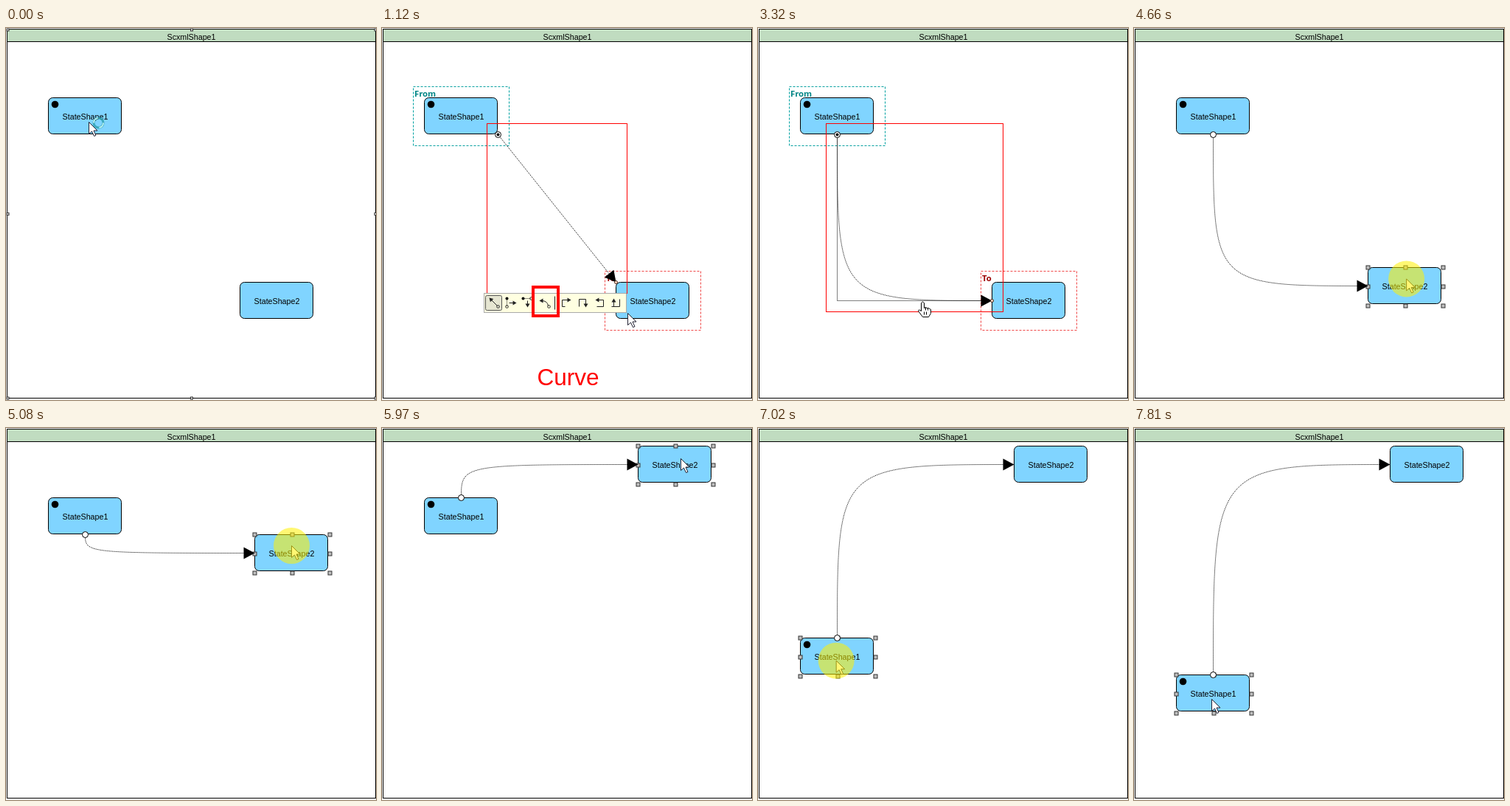
Recreate the animation shown at these times as an HTML page. Size 502 by 504 pixels, loop 8000 ms.

```html
<!DOCTYPE html>
<html lang="en">
<head>
<meta charset="utf-8">
<style>
  html, body { margin: 0; width: 100%; height: 100%; overflow: hidden; background: #fff; }
  svg { display: block; }
  text { font: 10.7px "Liberation Sans", Arial, sans-serif; }
  .tag { font: bold 11.3px "Open Sans", "Noto Sans", sans-serif; }
  .callout { font-size: 31.5px; fill: #f00; }
  .dots { fill: none; stroke: #000; stroke-dasharray: 1 1; }
  .icon { fill: none; stroke: #222; }
</style>
</head>
<body>
<svg width="502" height="504" viewBox="0 0 502 504"><g id="scene" transform="translate(.5 .5)"></g></svg>
<script>
const LOOP = 8000;
const scene = document.getElementById('scene');

// Screen updates come in bursts: [first, last, number of updates]
const BURSTS = [
  [70, 840, 12], [910, 1120, 4], [2310, 2790, 8], [3120, 3320, 3], [4040, 4800, 10],
  [4870, 5640, 12], [5970, 6740, 12], [6810, 7370, 9], [7700, 7810, 2]
];

// Pointer path: time, x, y
const POINTER = [
  [70, 112, 127], [840, 384, 366], [1120, 333, 386], [2240, 333, 386], [2500, 275, 396],
  [2790, 222, 371], [4040, 222, 371], [4520, 367, 359], [4590, 367, 359], [4800, 378, 259],
  [5080, 387, 159], [5640, 401, 42], [5970, 405, 41], [6460, 106, 123], [6530, 106, 123],
  [6670, 106, 163], [6740, 106, 223], [6950, 106, 305], [7370, 104, 363], [7700, 104, 363],
  [7810, 105, 367]
];

const PRESSES = [[140, 910], [3120, 3320], [4590, 5970], [6530, 7370]];
const PICKED = 3220, COMMIT = 4040, DRAG2 = 4590, DRAG1 = 6530;

const clamp = (v, lo, hi) => Math.min(hi, Math.max(lo, v));
const between = (t, a, b) => t >= a && t < b;

function hold(t) {
  const burst = BURSTS.filter(b => b[0] <= t).pop();
  if (!burst) return 0;
  const [first, last, count] = burst;
  const step = (last - first) / (count - 1);
  return Math.min(last, first + Math.floor((t - first) / step + 1e-6) * step);
}

function pointerAt(t) {
  const next = POINTER.findIndex(k => k[0] > t);
  if (next === 0) return POINTER[0].slice(1);
  if (next < 0) return POINTER[POINTER.length - 1].slice(1);
  const [a, b] = [POINTER[next - 1], POINTER[next]];
  const f = (t - a[0]) / (b[0] - a[0]);
  return [a[1] + (b[1] - a[1]) * f, a[2] + (b[2] - a[2]) * f];
}

// Position of a state dragged on a 10 px grid
function dragged(home, t, from, to) {
  if (t < from) return home;
  const a = pointerAt(from), b = pointerAt(Math.min(t, to));
  return home.map((v, i) => v + Math.round((b[i] - a[i]) / 10) * 10);
}

const rect = (x, y, w, h, attrs) => `<rect x="${x}" y="${y}" width="${w}" height="${h}" ${attrs}/>`;
const circle = (x, y, r, attrs = '') => `<circle cx="${x}" cy="${y}" r="${r}" ${attrs}/>`;
const path = (d, attrs) => `<path d="${d}" ${attrs}/>`;
const label = (x, y, s, attrs = 'text-anchor="middle"') => `<text x="${x}" y="${y}" ${attrs}>${s}</text>`;
const OUTLINE = 'fill="#fff" stroke="#000"';

function handles(x, y, dx, dy, size, fill) {
  let out = '';
  for (const i of [0, 1, 2]) for (const j of [0, 1, 2])
    if (i !== 1 || j !== 1)
      out += rect(x + i * dx - size / 2, y + j * dy - size / 2, size, size, `fill="${fill}" stroke="#333"`);
  return out;
}

function stage(selected) {
  return rect(1, 1, 500, 500, OUTLINE) +
    rect(1, 1, 500, 17, 'fill="#c0dcc0" stroke="#000"') +
    label(251, 15.5, 'ScxmlShape1') +
    (selected ? handles(2, 2, 249.5, 249.5, 3, '#ddd') : '');
}

function state([x, y], name, initial, selected) {
  return rect(x, y, 99, 49, 'rx="6" fill="#80d4ff" stroke="#000"') +
    (initial ? circle(x + 9, y + 9, 4.8) : '') +
    label(x + 50, y + 29.5, name) +
    (selected ? handles(x, y, 51, 26, 5, '#c0c0c0') : '');
}

function zone(x, y, name, line, ink) {
  return rect(x, y, 130, 80, `fill="none" stroke="${line}" stroke-dasharray="3 2"`) +
    label(x + 1.5, y + 13, name, `class="tag" fill="${ink}"`);
}

function arrow(x, y, angle) {
  return path('M0 0L-15 -8V8Z', `transform="translate(${x} ${y}) rotate(${angle})"`);
}

const bounds = (a, b) => rect(a[0] - 15, a[1] - 15, b[0] - a[0] + 30, b[1] - a[1] + 30, 'fill="none" stroke="#f00"');
const line = d => path(d, 'class="dots"');
const curve = ([x, y], [u, v]) => line(`M${x} ${y}C${x} ${v} ${x} ${v} ${u} ${v}`);
const anchor = ([x, y]) => circle(x, y, 4, OUTLINE) + circle(x, y, 2);
const tip = ([x, y]) => circle(x, y, 2, 'fill="#fdc" stroke="#421"');

function straightLink(a, b) {
  const angle = Math.atan2(b[1] - a[1], b[0] - a[0]) * 180 / Math.PI;
  return bounds(a, b) + line(`M${a}L${b}`) + arrow(b[0], b[1], angle) + anchor(a) + tip(b);
}

function curvePreview(a, b) {
  return bounds(a, b) + line(`M${a}V${b[1]}H${b[0]}`) + curve(a, b) +
    arrow(b[0], b[1], 0) + anchor(a) + tip(b);
}

function curveLink(s1, s2) {
  const end = [s2[0], s2[1] + 25];
  const start = [s1[0] + 50, s1[1] + (end[1] > s1[1] + 25 ? 50 : 0)];
  return curve(start, end) + arrow(end[0], end[1], 0) + circle(...start, 4, OUTLINE);
}

function popup(hover) {
  const icon = d => path(d, 'class="icon"');
  const head = (x, y, angle) =>
    path('M0 0L-5 -3V3Z', `fill="#222" transform="translate(${x} ${y}) rotate(${angle})"`);
  const ring = (x, y) => circle(x, y, 1.8, 'class="icon"');
  const dashed = d => path(d, 'class="icon" stroke-dasharray="1 1"');
  return rect(138, 359, 193, 26, 'fill="#ffffe1" stroke="#aaa"') +
    rect(140, 362, 22, 20, 'rx="2" fill="#e6e6d2" stroke="#555"') +
    (hover ? rect(209, 362, 22, 20, 'rx="2" fill="#f2f2da" stroke="#777"') : '') +
    icon('M146 366L156 376') + head(145, 365, 225) + ring(157, 377) +
    dashed('M169 367V376') + circle(169, 366, 2) + ring(169, 377) + icon('M172 372H180') + head(182, 372, 0) +
    dashed('M192 366H202') + circle(191, 366, 2) + ring(202, 366) + icon('M197 369V376') + head(197, 378, 90) +
    icon('M216 369Q224 369 225 376') + head(213, 369, 180) + ring(226, 377) +
    icon('M234 363V381') +
    icon('M244 377V368H252') + head(256, 368, 0) + icon('M244 377H248') +
    icon('M267 377V367H276V374') + head(276, 378, 90) +
    icon('M291 377H300V368H293') + head(289, 368, 180) +
    icon('M311 377H322V367M314 377V370') + head(314, 366, 270);
}

function callout(opacity) {
  return `<g opacity="${opacity}">` +
    rect(204.5, 350.5, 34, 39, 'fill="none" stroke="#f00" stroke-width="4"') +
    label(252, 483.5, 'Curve', 'class="callout" text-anchor="middle"') + '</g>';
}

function pointer([x, y], hand) {
  const arrowShape = path('M0 0V16L4 12.5L7 19L9.5 18L6.5 11.5H11.5Z', 'fill="#fff" stroke="#223"');
  const handShape = path('M-1 1Q1 -2 3 1V8L5 7L7 8L9 8L12 10V15L9 20H1L-5 12Q-5 9 -1 12Z', 'fill="#fff" stroke="#000"') +
    path('M5 7V11M8 8V11M3 13V17M6 13V17', 'stroke="#000" fill="none"');
  return `<g transform="translate(${x} ${y})">${hand ? handShape : arrowShape}</g>`;
}

function render(t) {
  const at = pointerAt(t);
  const s1 = dragged([57, 94], t, DRAG1, 7370);
  const s2 = dragged([317, 344], t, DRAG2, 5640);
  const corner = [157, 144];
  let out = stage(t < 910) +
    state(s1, 'StateShape1', true, t >= DRAG1) +
    state(s2, 'StateShape2', false, between(t, DRAG2, 6460));

  if (between(t, 140, COMMIT)) out += zone(42, 79, 'From', '#00a0a0', '#008585');
  if (between(t, 910, COMMIT)) out += zone(302, 329, 'To', '#f04848', '#900');

  if (between(t, 140, 910)) {
    if (at[0] > 160 && at[1] > 147) out += straightLink(corner, at);
  } else if (between(t, 910, PICKED)) {
    out += straightLink(corner, [317, 344]);
  } else if (between(t, PICKED, COMMIT)) {
    out += curvePreview([107, 144], [317, 369]);
  } else if (t >= COMMIT) {
    out += curveLink(s1, s2);
  }

  if (between(t, 980, PICKED)) out += popup(t > 2640);
  const fade = Math.min((t - 840) / 280, (3320 - t) / 300);
  if (fade > 0) out += callout(clamp(fade, 0, 1));

  out += pointer(at, between(t, PICKED, 4100));
  if (t < 70) {
    out += circle(125, 128, 6.5, 'fill="none" stroke="#2a9fae" stroke-width="3" opacity=".8"') +
      circle(125, 128, 6.5, 'fill="none" stroke="#b8f0f0" stroke-width="2" stroke-dasharray="9 11"');
  }
  if (PRESSES.some(([a, b]) => between(t, a, b))) out += circle(at[0], at[1], 24.5, 'fill="#fff000" opacity=".55"');
  scene.innerHTML = out;
}

let shown = -1;
function tick(now) {
  const t = hold(now % LOOP);
  if (t !== shown) render(shown = t);
  requestAnimationFrame(tick);
}
tick(performance.now());
</script>
</body>
</html>
```
